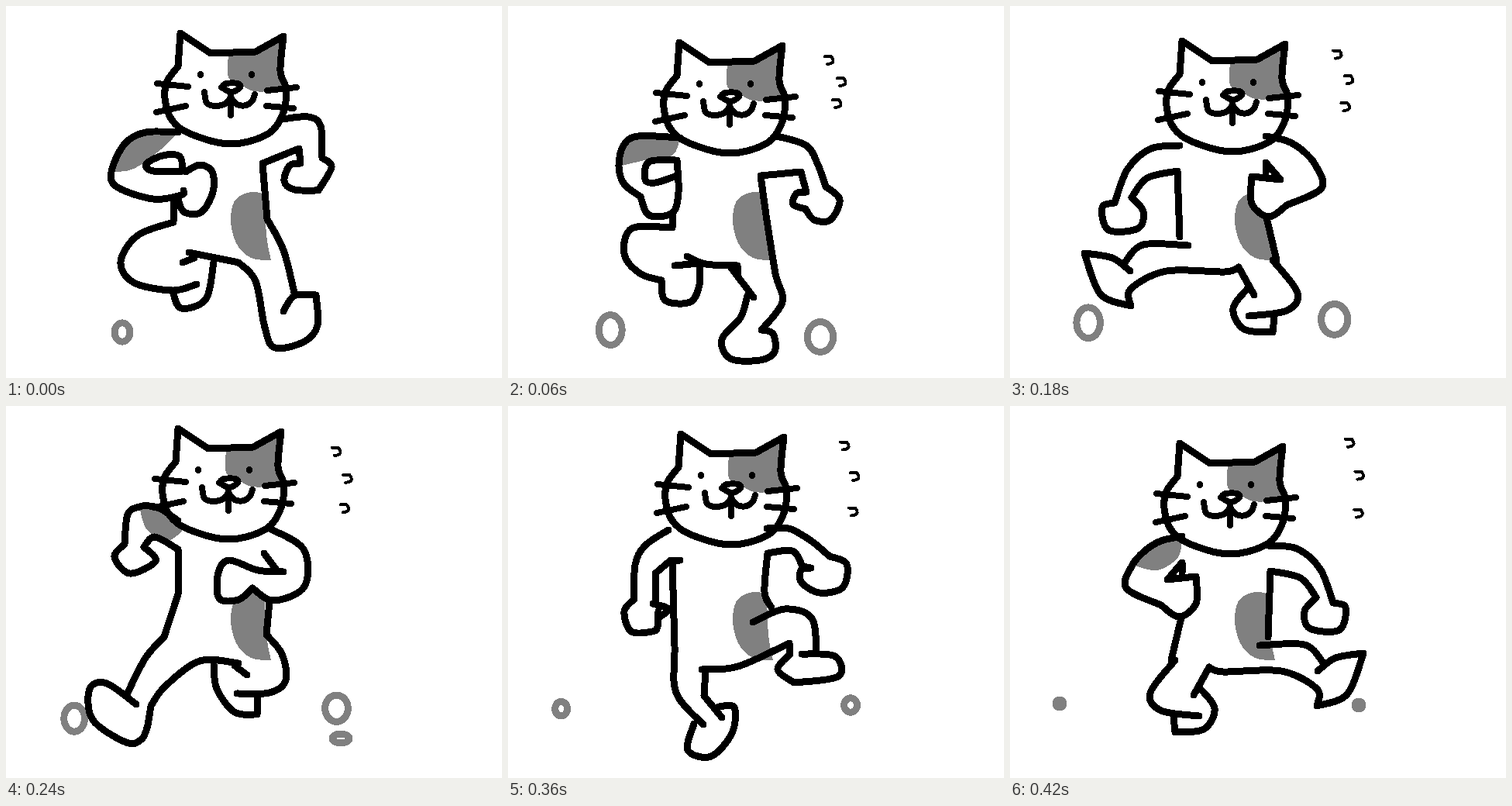
An HTML page that plays this animation: 640x480 px, repeating every 480 ms.

```html
<!DOCTYPE html>
<html lang="en">
<head>
<meta charset="utf-8">
<title>Running cat</title>
<style>
html, body { margin: 0; width: 100%; height: 100%; overflow: hidden; background: #fff; }
svg { display: block; width: 100vw; height: 100vh; fill: none; stroke: #000; stroke-linecap: round; stroke-linejoin: round; shape-rendering: crispEdges; }
.ink { stroke-width: 9; }
.solid { stroke-width: 9; fill: #fff; }
.face { stroke-width: 8; }
.mark { stroke-width: 4; }
.spot { fill: #808080; stroke: none; }
.dust { stroke: #808080; stroke-width: 9; }
</style>
</head>
<body>
<svg id="stage" viewBox="0 0 640 480"></svg>
<script>
const STEP = 60, AXIS = 276;

// Key points "x,y" joined by a smooth curve; "!" marks a sharp corner.
// Arms start at the shoulder; `inner` closes the grey patch on the left arm.
const landing = {
  left: '222,163! 180,163 153,178 136,214 144,234 190,249 226,244 229,238',
  right: '357,146! 390,143 406,155 408,196! 420,208 403,238! 372,237 359,226 366,206 380,203! 378,184! 331,203! 337,275',
  inner: '165,210 200,185',
  lines: ['228,213! 190,213 181,204 202,193 224,194 228,213', '232,214! 250,205 266,214 267,240 252,266 230,266 222,250',
    '217,246 216,279! 170,296 148,330 165,357 215,367 246,359', '215,368 226,390 258,378 268,330', '228,331 243,325',
    '236,318 300,331! 322,355 334,415 347,441 385,433 402,412 400,373! 372,374 358,394', '337,275! 358,315 372,370']
};
const standing = {
  left: '222,170! 168,168 149,180 143,207 150,230 171,246! 182,270 212,267 220,240 218,199! 182,201 177,224 190,228 218,219',
  right: '347,168! 385,180 400,205 410,233! 428,250 416,276 395,276 384,262! 368,256 372,242 385,240! 378,214! 326,219! 333,270',
  inner: '185,197 213,192',
  lines: ['213,268 212,286! 160,287 150,320 170,345 198,354! 203,380 235,382 247,360 247,332! 215,335',
    '231,323! 255,333 296,335! 297,348! 288,338! 317,376',
    '309,374! 300,402 276,430 287,455 325,457 344,446 342,423 327,418! 354,382 345,345 333,270']
};
const kneeUp = {
  left: '218,158! 190,158 175,165 158,176 137,194! 115,204 120,234 150,241 173,228 174,212 161,209! 172,207! 185,187 217,190! 221,240 212,260',
  right: '345,160! 375,180 388,205 389,249! 402,265 393,291 366,291 359,285 358,265',
  inner: '185,186 218,183',
  lines: ['365,255 345,262 359,274', '330,199! 342,199! 362,216! 361,255',
    '236,279! 195,262 160,274 154,320', '173,320! 130,323 126,349 183,357! 204,340 188,320! 189,306! 255,336 302,340',
    '297,341! 299,374! 276,402', '280,388! 260,389 263,422 290,452 320,444 312,410', '300,411! 335,370 337,310 340,200']
};
const striding = {
  left: '222,148! 200,133 185,129 172,130 157,140 153,178! 140,195 160,216 193,200 178,182! 192,169 222,185! 222,243! 204,298',
  right: '340,158! 384,185 385,233 345,251 318,235! 300,250 275,248 274,215 288,199 325,212 358,214',
  inner: '182,160 208,174 230,157',
  lines: ['333,190! 350,213', '204,298! 180,325 156,372',
    '168,385! 130,358 108,365 112,405 155,434 175,430 183,412! 187,387! 205,362 250,329 300,332',
    '295,335 311,347', '268,333! 272,365 295,395 324,398! 324,375', '298,371! 340,370 361,354 356,320 336,295! 340,253']
};
const passing = {
  left: '213,157! 190,163 172,178 155,200 137,240! 109,255 130,280 168,270 161,247! 180,222 218,195! 220,250 212,297',
  right: '335,168! 385,197 397,235 355,256! 340,274 295,274 292,250 315,235 340,237! 360,222 328,197',
  inner: '185,210 218,190',
  lines: ['342,205 340,237', '215,298! 178,330 175,370 195,409', '190,401! 155,425 165,443 215,439 233,415 215,389',
    '213,400! 215,360 240,341 303,332', '298,335! 303,357 289,361! 298,345',
    '295,352! 275,370 300,402 335,412 343,390', '318,391! 355,382 353,335 335,305 334,280']
};
const kicking = {
  left: '222,168! 195,174 175,186 158,205 150,235 195,257! 218,272 240,255 240,220! 203,224! 222,202! 222,215',
  right: '333,180! 370,184 400,210 417,254! 433,260 425,289 387,287 380,265 395,247! 375,222 336,213! 333,298',
  inner: '190,212 217,195',
  lines: ['221,273! 208,328', '213,328! 181,370 195,393 244,400', '211,401 213,421! 250,417 264,390 243,362',
    '237,373! 257,337! 275,343 350,342 396,365 396,387! 435,372 456,319! 420,325 397,342', '404,331! 380,308 322,309']
};

const flip = text => text.replace(/(\d+),/g, (_, x) => 2 * AXIS - x + ',');
const mirror = (p, inner) =>
  ({ left: flip(p.right), right: flip(p.left), lines: p.lines.map(flip), inner });

const poses = [landing, standing, kneeUp, mirror(kicking, '185,212 216,200'),
  striding, passing, mirror(kneeUp, '190,205 214,190'), kicking];

// Catmull-Rom curve through the points; a repeated point makes a corner.
function curve(text, closed) {
  const pts = text.split(' ').flatMap(s => {
    const p = s.replace('!', '').split(',').map(Number);
    return s.endsWith('!') ? [p, p] : [p];
  });
  const n = pts.length;
  const at = i => closed ? pts[(i + n) % n] : pts[Math.max(0, Math.min(n - 1, i))];
  const handle = (p, a, b) => p.map((v, j) => (v + (b[j] - a[j]) / 6).toFixed(1));
  let d = 'M' + pts[0];
  for (let i = 0; i < (closed ? n : n - 1); i++) {
    const p = at(i), q = at(i + 1);
    if (p !== q) d += `C${handle(p, at(i - 1), q)} ${handle(q, at(i + 2), p)} ${q}`;
  }
  return closed ? d + 'Z' : d;
}

const path = (cls, d) => `<path class="${cls}" d="${d}"/>`;
const strokes = (cls, list) => list.map(s => path(cls, curve(s))).join('');
const spot = text => path('spot', curve(text, true));
const ring = (x, y, rx, ry) => `<ellipse class="dust" cx="${x}" cy="${y}" rx="${rx}" ry="${ry}"/>`;

const head = spot('287,60! 322,60! 358,39! 354,85 357,109! 320,110 300,99 287,92') +
  strokes('ink', ['222,78! 225,35! 264,61! 322,59! 358,39! 354,84 361,106 358,137 338,165 290,178 238,165 214,147 205,119 208,97 222,78']) +
  strokes('face', ['251,88 251,89', '317,88 317,89',
    '278,105 284,100 299,100 302,105 291,111 278,105',
    '256,111 259,125 270,129 283,126 290,118! 298,127 310,128 318,122 321,114', '290,114 290,141',
    '195,100 235,104', '194,137 232,129', '337,109 375,105', '336,129 371,132']);

// The head bobs on every second step and drifts a little over the run.
function headAt(i) {
  const [x, y] = [[0, 0], [1, -2], [-3, -6], [-2, 1]][i >> 1];
  const odd = i % 2;
  return `<g transform="translate(${x - 4 * odd} ${y + 12 * odd})">${head}</g>`;
}

// Puffs swell, then shrink while they drift outwards and up.
function dustAt(i) {
  const u = i / 7, w = (i - 1) / 6;
  const size = Math.sin(Math.PI * ((i + 0.3) / 7.3) ** 0.6);
  const r = k => 5 + k * size;
  let out = ring(64 + 86 * (1 - u) ** 1.5, 421 - 37 * u ** 1.3, r(11), r(16));
  if (i > 0) {
    const s = Math.min(1, 1.6 * w);
    out += ring(403 + 47 * w, 427 - 41 * s * s * (3 - 2 * s), r(13), r(16));
  }
  if (i === 4 || i === 5) out += ring(432 + 11 * (i - 4), 429 - 9 * (i - 4), 11, 6);
  return out;
}

// Three little hooks spread away from the head.
function marksAt(i) {
  if (i === 0) return '';
  const k = i - 1;
  return [[414 + 4 * k, 70 - 3.7 * k], [430 + 3.4 * k, 98 - 1.4 * k], [424 + 4.2 * k, 126 + 2.1 * k]]
    .map(([x, y]) => path('mark', `M${x - 5} ${y - 5}h8q7 9 -5 10`)).join('');
}

function poseMarkup(p, i) {
  const patch = p.left.split(' ').slice(0, 4).join(' ') + '! ' + p.inner;
  return '<g>' + dustAt(i) + spot(patch) +
    spot('316,240 296,250 290,276 297,306 316,325 342,328! 336,295 334,243!') +
    strokes('solid', [p.right]) + strokes('ink', [p.left, ...p.lines]) +
    headAt(i) + marksAt(i) + '</g>';
}

const stage = document.getElementById('stage');
stage.innerHTML = poses.map(poseMarkup).join('');
const groups = [...stage.children];

function draw(time) {
  const now = Math.floor(time / STEP) % poses.length;
  groups.forEach((g, i) => g.setAttribute('display', i === now ? 'inline' : 'none'));
}

const start = performance.now();
function tick() {
  draw(performance.now() - start);
  requestAnimationFrame(tick);
}
tick();
</script>
</body>
</html>
```
